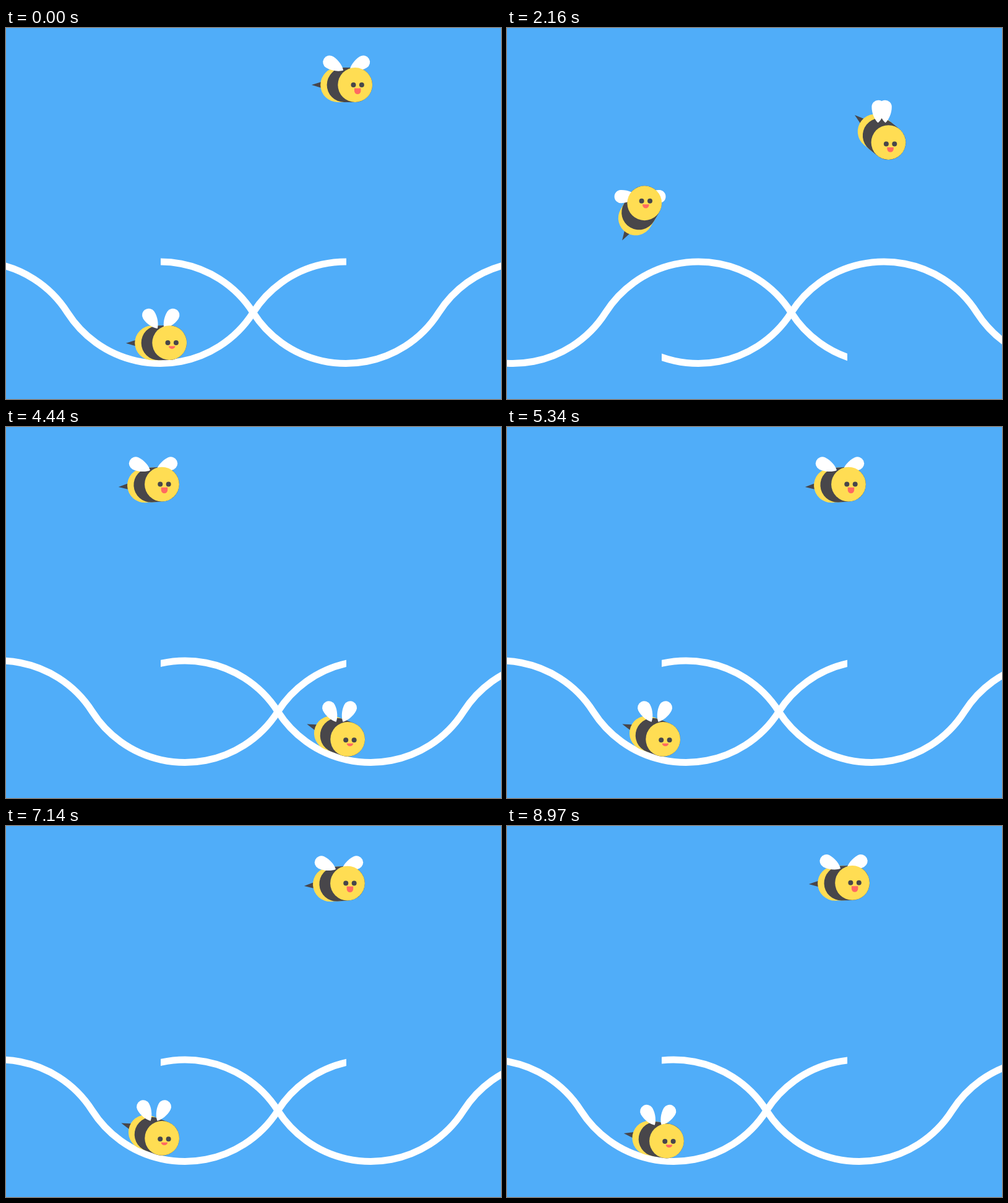
Animation of 800 by 600 pixels, one loop 9000 ms. Source, as an HTML page with a canvas:

```html
<!DOCTYPE html>
<html>
<head>
<meta charset="utf-8">
<style>
html, body { margin: 0; width: 100%; height: 100%; overflow: hidden; background: #50adf9; }
canvas { display: block; }
</style>
</head>
<body>
<canvas id="stage" width="800" height="600"></canvas>
<script>
const ctx = document.getElementById('stage').getContext('2d');
const TAU = Math.PI * 2;
const LOOP = 1800, SPEED = 600 / 900;
const BLUE = '#50adf9', YELLOW = '#ffdd53', DARK = '#48464a', RED = '#ff6961', WHITE = '#fff';

// Flight over the scrolling ground: out of one trough, over the top, into the next.
const flight = document.createElementNS('http://www.w3.org/2000/svg', 'path');
flight.setAttribute('d', `M250 509.2 A145 145 0 0 0 372 442
  Q401.2 396.5 405.3 388.4 C491.6 219.1 565 92 850 92
  C1135 92 1208.4 219.1 1294.7 388.4 Q1298.8 396.5 1328 442
  A145 145 0 0 0 1450 509.2`);
const flightLength = flight.getTotalLength();

const wingShape = new Path2D(`M0 1 C-5 -3 -10.7 -14 -10.7 -24.8
  A10.7 10.7 0 0 1 10.7 -24.8 C10.7 -14 5 -3 0 1Z`);

function disc(x, y, r, color) {
  ctx.fillStyle = color;
  ctx.beginPath();
  ctx.arc(x, y, r, 0, TAU);
  ctx.fill();
}

function capsule(x0, x1, color) {
  ctx.strokeStyle = color;
  ctx.lineWidth = 56;
  ctx.lineCap = 'round';
  ctx.beginPath();
  ctx.moveTo(x0, 0);
  ctx.lineTo(x1, 0);
  ctx.stroke();
}

function wave(left, right, trough) {
  const rise = 82.25, r = (150 * 150 + rise * rise) / (2 * rise);
  const a = Math.asin(150 / r), q = Math.PI / 2;
  ctx.save();
  ctx.beginPath();
  ctx.rect(left, 0, right - left, 600);
  ctx.clip();
  ctx.beginPath();
  for (let x = trough - 1200; x < 1400; x += 600) {
    ctx.arc(x, 542.5 - r, r, q + a, q - a, true);
    ctx.arc(x + 300, 378 + r, r, -q - a, -q + a);
  }
  ctx.strokeStyle = WHITE;
  ctx.lineWidth = 11;
  ctx.lineCap = 'butt';
  ctx.stroke();
  ctx.restore();
}

function wings(phase) {
  const spread = 46 - 11.6 * Math.cos(phase) + 48.3 * Math.sin(phase)
    - 1.4 * Math.cos(3 * phase) - 6 * Math.sin(3 * phase);
  ctx.fillStyle = WHITE;
  for (const side of [-1, 1]) {
    ctx.save();
    ctx.translate(side * 6, -24);
    ctx.rotate(side * spread * Math.PI / 180);
    ctx.fill(wingShape);
    ctx.restore();
  }
}

function face(x, y, phase) {
  disc(x - 6.7, y, 4, DARK);
  disc(x + 6.7, y, 4, DARK);
  const h = 7 - 2.5 * Math.cos(phase), w = 5.2, round = Math.min(h, w);
  const top = y + 5.4;
  ctx.fillStyle = RED;
  ctx.beginPath();
  ctx.moveTo(x - w, top);
  ctx.lineTo(x + w, top);
  ctx.ellipse(x, top + h - round, w, round, 0, 0, Math.PI);
  ctx.fill();
}

function bee(t, shift) {
  const p = t % LOOP, phase = p / LOOP * TAU;
  const d = p / LOOP * flightLength;
  const at = flight.getPointAtLength(d);
  const back = flight.getPointAtLength(Math.max(0, d - 1));
  const ahead = flight.getPointAtLength(Math.min(flightLength, d + 1));
  const tilt = Math.atan2(ahead.y - back.y, ahead.x - back.x);
  const c = Math.cos(tilt), s = Math.sin(tilt);

  ctx.save();
  ctx.translate(at.x - SPEED * p + shift, at.y);

  ctx.save();
  ctx.rotate(tilt);
  ctx.fillStyle = DARK;
  ctx.beginPath();
  ctx.moveTo(-56.3, 0);
  ctx.lineTo(-32, -7.5);
  ctx.lineTo(-32, 7.5);
  ctx.fill();
  capsule(-14, 0, YELLOW);
  capsule(-3.6, 14, DARK);
  ctx.restore();

  // Wings and face stay upright while the body tilts.
  wings(phase);
  disc(14 * c, 14 * s, 27.9, YELLOW);
  face(18 * c, 18 * s, phase);
  ctx.restore();
}

function draw(t) {
  ctx.fillStyle = BLUE;
  ctx.fillRect(0, 0, 800, 600);
  const scroll = t * SPEED % 600;
  wave(0, 550, 250 - scroll);
  wave(250, 800, 550 - scroll);
  bee(t, 0);
  bee(t + LOOP / 2, 300);
}

const start = performance.now();
function tick() {
  draw((performance.now() - start) % 9000);
  requestAnimationFrame(tick);
}
tick();
</script>
</body>
</html>
```
